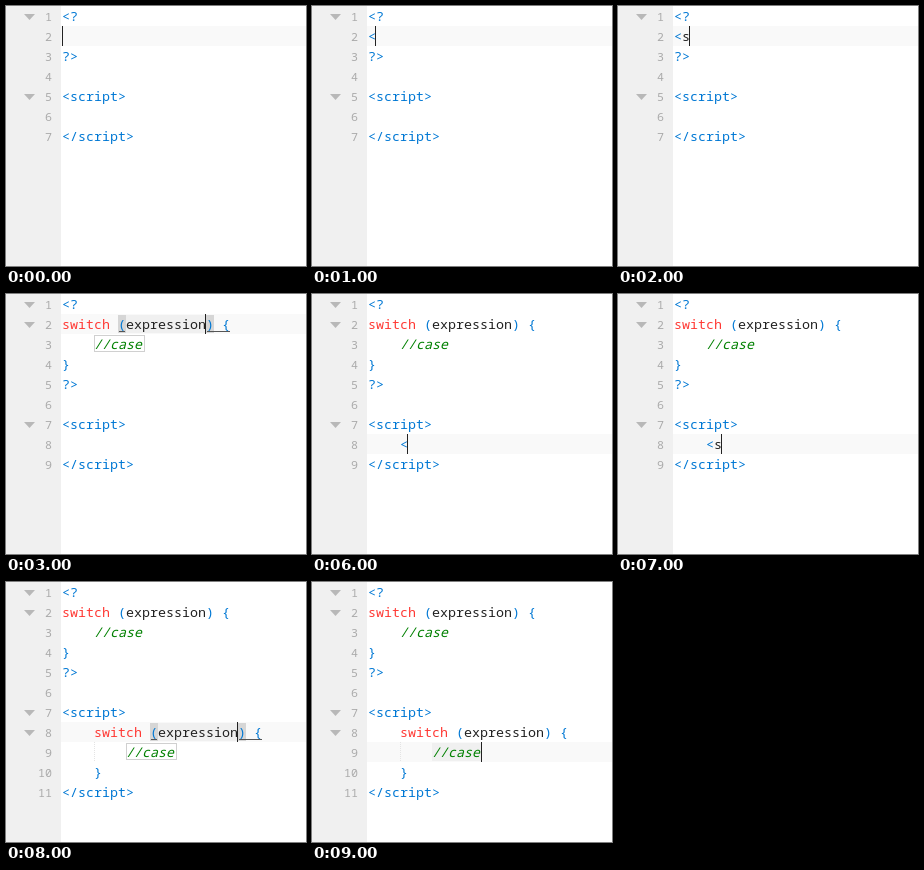
An HTML page for the animation above (10 s loop, 300x260 px).

```html
<!DOCTYPE html>
<html lang="en">
<head>
<meta charset="utf-8">
<title>Code snippets</title>
<style>
html, body { margin: 0; width: 100%; height: 100%; overflow: hidden; background: #fff; }
svg { display: block; width: 300px; height: 260px; }
text { font: 13.333px "Noto Sans Mono", "DejaVu Sans Mono", monospace; white-space: pre; }
.num { font-size: 11.667px; fill: #aaa; text-anchor: end; }
.tag { fill: #0078d4; }
.key { fill: #ff3a35; }
.note { fill: #008000; font-style: italic; }
.word { fill: #222; }
</style>
</head>
<body>
<svg id="stage" viewBox="0 0 300 260"></svg>
<script>
const LOOP = 10000, STEP = 1000;
const LEFT = 56, CHAR = 8, ROW = 20;
const stage = document.getElementById('stage');

const TOKEN = /(\/\/\w+)|(switch)|(<\/?script>|<\?|\?>|[<(){}])|(\w+)/g;
const KINDS = ['note', 'key', 'tag', 'word'];

const snippet = pad => [pad + 'switch (expression) {', pad + '    //case', pad + '}'];
const page = (php, js) => ['<?', ...php, '?>', '', '<script>', ...js, '<\/script>'];

// row: caret line, x: caret position, col: snippet column, field: selected placeholder
const full = snippet(''), inner = snippet('    ');
const states = [
  { lines: page([''], ['']), row: 1, x: 56 },
  { lines: page(['<'], ['']), row: 1, x: 63 },
  { lines: page(['<s'], ['']), row: 1, x: 71 },
  { lines: page(full, ['']), row: 1, x: 199, col: 0, field: 'expression' },
  { lines: page(full, ['']), row: 2, x: 137, col: 0, field: 'case' },
  { lines: page(full, ['']), row: 7, x: 87 },
  { lines: page(full, ['    <']), row: 7, x: 95 },
  { lines: page(full, ['    <s']), row: 7, x: 103 },
  { lines: page(full, inner), row: 7, x: 231, col: 4, field: 'expression' },
  { lines: page(full, inner), row: 8, x: 169, col: 4, field: 'case' }
];

const rect = (x, y, w, h, fill) =>
  `<rect x="${x}" y="${y}" width="${w}" height="${h}" fill="${fill}"/>`;

const label = (x, y, kind, s) =>
  `<text x="${x}" y="${y}" class="${kind}">${s.replace(/</g, '&lt;').replace(/>/g, '&gt;')}</text>`;

function drawLine(line, i) {
  const top = i * ROW;
  let out = label(46, top + 15, 'num', String(i + 1));
  if (/^(<\?|<script>)|switch/.test(line)) {
    out += `<path d="M18 ${top + 8}h11l-5.5 6z" fill="#b8b8b8"/>`;
  }
  // Indent guide inside a nested block
  if (/^ {8}/.test(line)) {
    out += `<path d="M88.5 ${top}v${ROW}" stroke="#e4e4e4" stroke-dasharray="1"/>`;
  }
  for (const m of line.matchAll(TOKEN)) {
    const kind = KINDS[m.slice(1).findIndex(Boolean)];
    out += label(LEFT + m.index * CHAR, top + 15, kind, m[0]);
  }
  return out;
}

// Selected placeholder, with matched brackets and the outline of the next one
function drawField({ row, col, field }) {
  const x = LEFT + col * CHAR, y = row * ROW;
  if (field === 'case') return rect(x + 32, y + 1, 49, 18, '#f0f0f0');
  return rect(x + 64, y + 1, 80, 18, '#f0f0f0') +
    rect(x + 56, y + 1, 8, 18, '#d6d6d6') +
    rect(x + 144, y + 1, 8, 18, '#d6d6d6') +
    rect(x + 57, y + 17, 6, 1, '#555') +
    rect(x + 145, y + 17, 23, 1, '#555') +
    `<rect x="${x + 32.5}" y="${y + 21.5}" width="50" height="16" fill="none" stroke="#d0d0d0"/>`;
}

function draw(state) {
  const y = state.row * ROW;
  stage.innerHTML = rect(0, 0, 300, 260, '#fff') +
    rect(55, y, 245, ROW, '#f9f9f9') +
    (state.field ? drawField(state) : '') +
    rect(0, 0, 55, 260, '#f0f0f0') +
    state.lines.map(drawLine).join('') +
    rect(state.x, y, 1, ROW, '#222');
}

let shown = -1;
const start = performance.now();
function tick() {
  const i = Math.floor((performance.now() - start) % LOOP / STEP);
  if (i !== shown) draw(states[shown = i]);
  requestAnimationFrame(tick);
}
tick();
</script>
</body>
</html>
```
